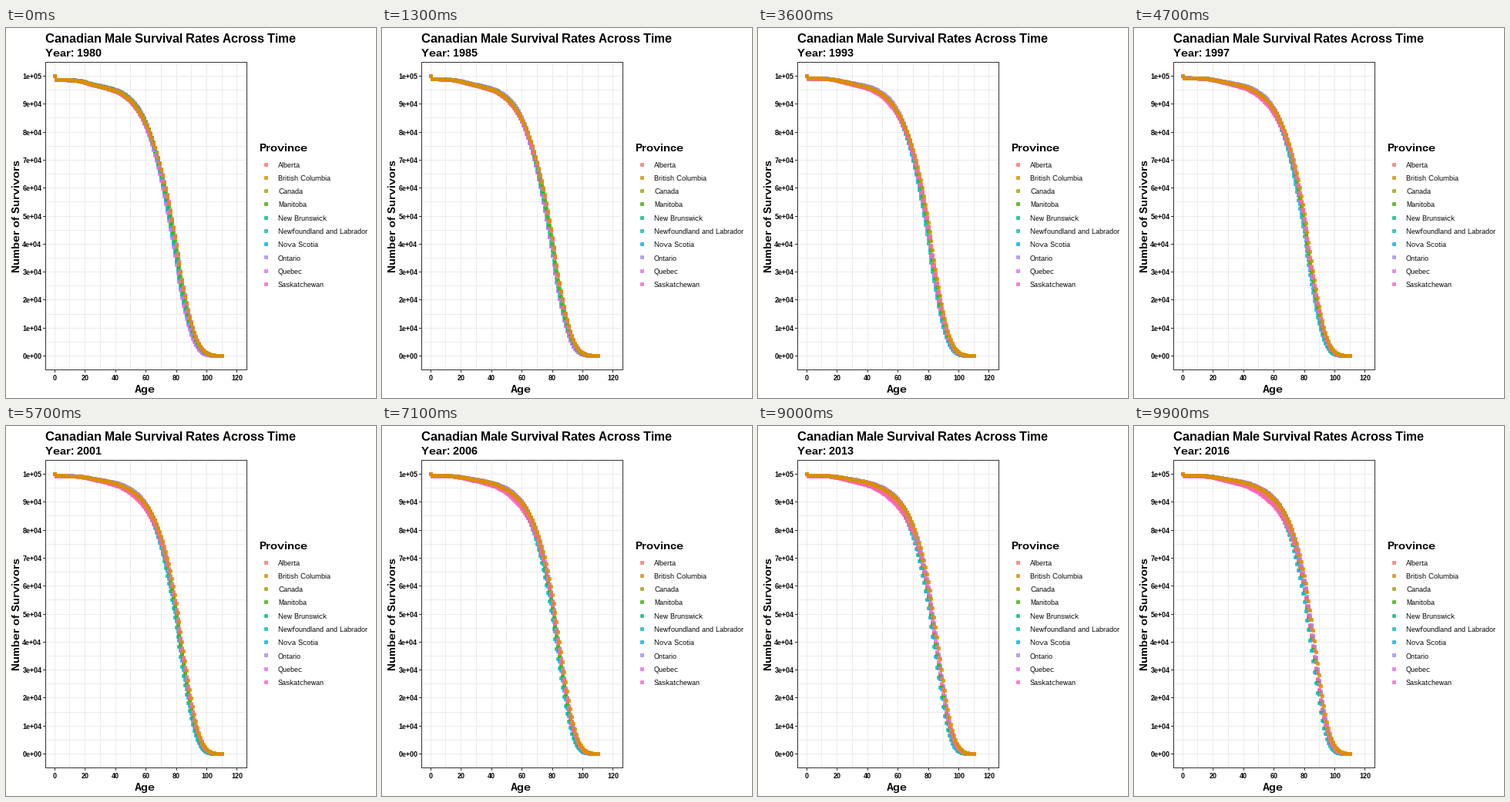
These frames come from a looping animation (480 by 480 pixels, 10000 ms). A matplotlib script:

```python
import numpy as np
import matplotlib.pyplot as plt
from matplotlib.animation import FuncAnimation
from matplotlib.colors import to_rgba

SIZE, DPI, FRAMES = 480, 96, 100
PT = 72 / DPI  # points per pixel
LEFT, RIGHT, TOP, BOTTOM = 51, 312, 44, 443
GRID, DARK = "#EBEBEB", "#333333"

# whole-pixel glyph widths, no kerning
plt.rcParams.update({
    "font.family": "Liberation Sans",
    "text.hinting": "native",
    "text.hinting_factor": 1,
    "text.kerning_factor": 6,
})

# name: colour, mortality relative to the country:
# (younger 1980, older 1980, younger 2016, older 2016)
PROVINCES = {
    "Alberta": ("#F8766D", (1.02, 0.93, 1.06, 1.00)),
    "British Columbia": ("#D89000", (1.03, 0.92, 0.98, 0.91)),
    "Canada": ("#A3A500", (1.00, 1.00, 1.00, 1.00)),
    "Manitoba": ("#39B600", (0.97, 0.96, 1.22, 1.08)),
    "New Brunswick": ("#00BF7D", (1.02, 1.04, 1.07, 1.07)),
    "Newfoundland and Labrador": ("#00BFC4", (0.99, 1.07, 1.14, 1.23)),
    "Nova Scotia": ("#00B0F6", (1.05, 1.08, 1.11, 1.11)),
    "Ontario": ("#9590FF", (0.92, 1.01, 0.92, 0.96)),
    "Quebec": ("#E76BF3", (1.07, 1.11, 0.91, 0.97)),
    "Saskatchewan": ("#FF62BC", (1.04, 0.91, 1.34, 1.06)),
}
# painted from east to west, the last one on top
ORDER = ["Canada", "Newfoundland and Labrador", "Nova Scotia", "New Brunswick",
         "Quebec", "Ontario", "Manitoba", "Saskatchewan", "Alberta",
         "British Columbia"]

# percent surviving at ages 5, 15, 25, ... 115
KNOT_YEARS = [1980, 1989, 2001, 2016]
SURVIVAL = np.array([
    [98.65, 98.35, 96.95, 95.6, 93.5, 88.0, 75.5, 51.8, 21.3, 3.2, 0.08, 1e-4],
    [99.05, 98.80, 97.70, 96.4, 94.7, 90.3, 79.4, 57.5, 25.2, 3.7, 0.09, 1e-4],
    [99.35, 99.20, 98.35, 97.3, 95.7, 92.2, 84.0, 65.5, 33.5, 6.0, 0.12, 1e-4],
    [99.45, 99.30, 98.50, 97.5, 96.1, 93.3, 87.3, 73.0, 44.5, 9.2, 0.25, 1e-4],
])
AGES = np.arange(111)


def smooth(knots):
    """Hermite curve through the knots, level below the first one."""
    slope = np.gradient(knots)
    s = np.maximum(AGES - 5, 0) / 10
    i = np.minimum(s.astype(int), len(knots) - 2)
    t = s - i
    return ((1 + 2 * t) * (1 - t) ** 2 * knots[i]
            + t * (1 - t) ** 2 * slope[i]
            + t ** 2 * (3 - 2 * t) * knots[i + 1]
            + t ** 2 * (t - 1) * slope[i + 1])


HAZARD = np.exp([smooth(np.log(-np.log(row / 100))) for row in SURVIVAL])
OLDNESS = np.clip((AGES - 55) / 20, 0, 1)


def px(age):
    return 63.2 + 1.973 * age


def py(share):
    return 425.5 - 363 * share


def center(v):
    return np.floor(v) + 0.5


def positions(year):
    k = min(np.searchsorted(KNOT_YEARS, year, side="right") - 1,
            len(KNOT_YEARS) - 2)
    t = (year - KNOT_YEARS[k]) / (KNOT_YEARS[k + 1] - KNOT_YEARS[k])
    hazard = (1 - t) * HAZARD[k] + t * HAZARD[k + 1]
    u = (year - 1980) / 36
    rows = []
    for name in ORDER:
        y0, o0, y1, o1 = PROVINCES[name][1]
        young, old = y0 + (y1 - y0) * u, o0 + (o1 - o0) * u
        alive = np.exp(-hazard * (young + (old - young) * OLDNESS))
        alive[0] = 1
        rows.append(np.column_stack([px(AGES), py(alive)]))
    return center(np.concatenate(rows))


fig = plt.figure(figsize=(SIZE / DPI, SIZE / DPI), dpi=DPI, facecolor="white")
ax = fig.add_axes([0, 0, 1, 1])
ax.set(xlim=(0, SIZE), ylim=(SIZE, 0))
ax.axis("off")


def line(xs, ys, color, z=1):
    ax.plot(xs, ys, color=color, lw=PT, antialiased=False, zorder=z,
            solid_capstyle="butt")


def label(x, y, s, size, bold=True, **kw):
    kw = {"va": "baseline", **kw}
    return ax.text(x, y, s, fontsize=size * PT, color="black",
                   weight="bold" if bold else "normal", **kw)


def dots(xy, names):
    colors = [to_rgba(PROVINCES[n][0], 0.6) for n in names]
    return ax.scatter(*np.transpose(xy), s=(4 * PT) ** 2, facecolors=colors,
                      edgecolors=colors, linewidths=PT, antialiased=False,
                      zorder=3)


# grid, ticks and axis labels
for age in range(0, 121, 10):
    x = np.floor(px(age))
    line([x, x], [TOP, BOTTOM], GRID)
    if age % 20 == 0:
        line([x, x], [BOTTOM, BOTTOM + 3], DARK, 4)
        label(px(age), 457.2, str(age), 9, ha="center")
for n in range(21):
    y = np.floor(py(n / 20))
    line([LEFT, RIGHT], [y, y], GRID)
    if n % 2 == 0:
        line([LEFT - 3, LEFT], [y, y], DARK, 4)
        label(46.3, y + 3.9, f"{n * 5000:.0e}", 9, ha="right")
line([LEFT, RIGHT, RIGHT, LEFT, LEFT], [TOP, TOP, BOTTOM, BOTTOM, TOP], DARK, 4)

label(51, 18.8, "Canadian Male Survival Rates Across Time", 16)
subtitle = label(51, 37, "Year: 1980", 14)
label(180.5, 473, "Age", 14, ha="center")
label(18, 244, "Number of Survivors", 14, ha="center", rotation=90,
      rotation_mode="anchor")

# legend
label(328, 160.2, "Province", 14)
key_y = 177 + 17.28 * np.arange(len(PROVINCES))
dots([(337.5, center(y)) for y in key_y], PROVINCES)
for name, y in zip(PROVINCES, key_y):
    label(353, y + 3.6, name, 9, bold=False)

points = dots(positions(1980), np.repeat(ORDER, len(AGES)))


def update(frame):
    year = 1980 + 36 * frame / (FRAMES - 1)
    points.set_offsets(positions(year))
    subtitle.set_text(f"Year: {round(year)}")
    return points, subtitle


anim = FuncAnimation(fig, update, frames=FRAMES, interval=100, repeat=True,
                     repeat_delay=0)
plt.show()
```
